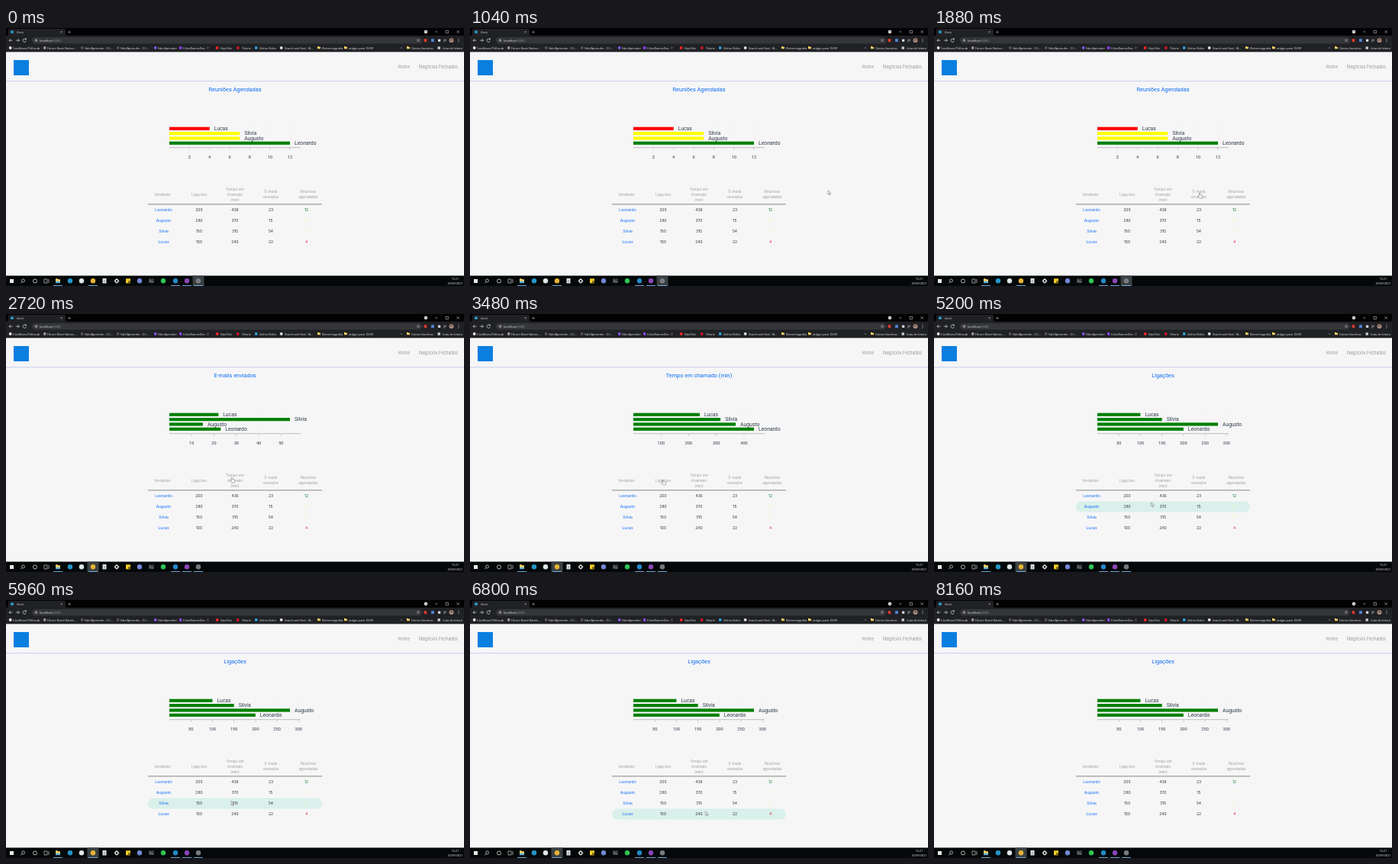
Write an HTML page that moves like this. It is 600 px wide and 338 px high and loops after 8.2 s.

```html
<!DOCTYPE html>
<html lang="pt-BR">
<head>
<meta charset="utf-8">
<title>Reuniões</title>
<style>
html, body { margin: 0; width: 100%; height: 100%; overflow: hidden; background: #f6f6f7; }
svg { display: block; width: 600px; height: 338px; }
text { dominant-baseline: central; }
.ui { font: 3.8px "Open Sans", sans-serif; fill: #e8e8ea; }
.page { font: 300 5px Inter, sans-serif; fill: #777; }
.chart { font: 6.8px Roboto, sans-serif; fill: #2f3a48; }
.chart .title { font-size: 7.35px; fill: #0b6cf2; }
.chart .tick { font-size: 5.6px; }
.mid { text-anchor: middle; }
.cell { font-weight: 400; fill: #333; }
.name { fill: #0a6cf5; }
.head { font-size: 4.8px; fill: #858585; }

.timed { visibility: hidden; animation: 8200ms step-end infinite; }
#chart0 { animation-name: chart0; }
#chart1 { animation-name: chart1; }
#chart2 { animation-name: chart2; }
#chart3 { animation-name: chart3; }
#row0 { animation-name: row0; }
#row1 { animation-name: row1; }
#row2 { animation-name: row2; }
#row3 { animation-name: row3; }
#recorder { animation-name: chart0; }
#browser { animation-name: browser; }
#hand { animation-name: hand; }
#arrow { animation-name: arrow; }
#pointer { animation: travel 8200ms linear infinite; }

@keyframes chart0 { 0% { visibility: visible } 23.17%, to { visibility: hidden } }
@keyframes chart1 { 0% { visibility: hidden } 23.17% { visibility: visible } 34.76%, to { visibility: hidden } }
@keyframes chart2 { 0% { visibility: hidden } 34.76% { visibility: visible } 43.9%, to { visibility: hidden } }
@keyframes chart3 { 0% { visibility: hidden } 43.9%, to { visibility: visible } }
@keyframes browser { 0% { visibility: hidden } 23.17%, to { visibility: visible } }
@keyframes row0 { 0% { visibility: hidden } 54.15% { visibility: visible } 62.6%, to { visibility: hidden } }
@keyframes row1 { 0% { visibility: hidden } 62.6% { visibility: visible } 71.2%, to { visibility: hidden } }
@keyframes row2 { 0% { visibility: hidden } 71.2% { visibility: visible } 77.2%, to { visibility: hidden } }
@keyframes row3 { 0% { visibility: hidden } 77.2% { visibility: visible } 88.2%, to { visibility: hidden } }
@keyframes hand { 0% { visibility: hidden } 14.6% { visibility: visible } 50%, to { visibility: hidden } }
@keyframes arrow { 0% { visibility: visible } 14.6% { visibility: hidden } 50%, to { visibility: visible } }
@keyframes travel {
  0%, 10.9% { transform: translate(604px, 215px) }
  12.68% { transform: translate(469.6px, 212.8px) }
  14.6% { transform: translate(405px, 214px) }
  18.3%, 28% { transform: translate(348px, 216px) }
  33.17%, 36% { transform: translate(296px, 214px) }
  42%, 46.5% { transform: translate(253px, 217px) }
  53.66% { transform: translate(277px, 231.5px) }
  63.41% { transform: translate(284.6px, 246.7px) }
  71.2% { transform: translate(292px, 260px) }
  77.2% { transform: translate(304px, 274px) }
  82.93%, 85.5% { transform: translate(308.4px, 276.7px) }
  92.2%, to { transform: translate(604px, 281px) }
}
</style>
</head>
<body>
<svg id="stage" viewBox="0 0 600 338" xmlns="http://www.w3.org/2000/svg"></svg>
<script>
const people = [
  { name: "Leonardo", values: [200, 436, 23, 12] },
  { name: "Augusto", values: [280, 370, 15, 7] },
  { name: "Silvia", values: [150, 315, 54, 7] },
  { name: "Lucas", values: [100, 240, 22, 4] }
];
const metrics = [
  { title: "Reuniões Agendadas", column: 3, step: 2 },
  { title: "E-mails enviados", column: 2, step: 10 },
  { title: "Tempo em chamado (min)", column: 1, step: 100 },
  { title: "Ligações", column: 0, step: 50 }
];

const rect = (x, y, w, h, fill, extra = "") =>
  `<rect x="${x}" y="${y}" width="${w}" height="${h}" fill="${fill}" ${extra}/>`;
const dot = (x, y, r, fill) => `<circle cx="${x}" cy="${y}" r="${r}" fill="${fill}"/>`;
const line = (d, color, width = .7) =>
  `<path d="${d}" fill="none" stroke="${color}" stroke-width="${width}"/>`;
const text = (x, y, value, cls = "", extra = "") =>
  `<text x="${x}" y="${y}" class="${cls}" ${extra}>${value}</text>`;
const group = (cls, body, id = "") => `<g class="${cls}" ${id && `id="${id}"`}>${body}</g>`;
const folder = (x, y, s, color = "#f2cf63") =>
  `<path d="M${x} ${y}h${s * .4}l${s * .15} ${s * .15}h${s * .45}v${s * .65}h${-s}z" fill="${color}"/>`;

function browserBar() {
  const marks = [
    [4, 9, "#eee", "CaioNeves/Trilha-ab"], [49, 54, "#999", "Fórum React Native..."],
    [98, 103, "#555", "Vale/Aprender - O I..."], [145, 150, "#555", "Vale/Aprender - O I..."],
    [194, 199, "#8257e5", "Vale Aprender"], [227, 232, "#9147ff", "CelsoRamosDev - T"],
    [275, 281, "#f22", "VejoTela"], [302, 309, "#d21420", "Telurix"],
    [326, 332, "#2aa5de", "Zelmo Video"], [359, 365, "#ddd", "Search and find - M..."]
  ];
  const folders = [[408, "Eletromiografia"], [443, "artigos para 10/09"], [525, "Outros favoritos"]];
  return rect(0, 0, 600, 10, "#020203") +
    rect(0, 10, 600, 21.4, "#202124") +
    `<path d="M1 10Q3 10 3 7V3Q3 1 5 1H76Q78 1 78 3V7Q78 10 80 10Z" fill="#202124"/>` +
    dot(8, 5.3, 2, "#2c9dcf") + text(14, 5.3, "Zorvi") +
    line("M71.5 4l2.4 2.4m0-2.4l-2.4 2.4M83 3.6v3.6m-1.8-1.8h3.6", "#ccc", .5) +
    dot(550, 5, 2.2, "#eee") + dot(550, 5, .7, "#222") +
    line("M562 5h3.5M576 3.3h3.4v3.4h-3.4zM590.5 3.3l3.4 3.4m0-3.4l-3.4 3.4", "#eee", .5) +
    line("M8.5 16.2h-4.5m2-2l-2 2 2 2M13 16.2h4.5m-2-2l2 2-2 2", "#ddd", .7) +
    line("M26.2 15a2.2 2.2 0 1 0 .2 2M26.4 13.4v1.8h-1.8", "#ddd", .7) +
    rect(34, 12, 511, 8.4, "#35363a", 'rx="4.2"') +
    dot(39.5, 16.2, 1.6, "#bbb") + dot(39.5, 16.2, .8, "#35363a") +
    text(44, 16.2, 'localhost<tspan fill="#9a9b9e">:3000</tspan>', "", 'font-size="4.1"') +
    line("M540 14.4l.5 1.2h1.3l-1 .9.4 1.3-1.2-.7-1.2.7.4-1.3-1-.9h1.3z", "#ccc", .4) +
    rect(547.5, 14.2, 3.8, 4, "#d23a2e") + rect(557, 14.2, 3.8, 4, "#4f86d8") +
    rect(566, 14.7, 3.2, 3.2, "#ddd") + line("M573 15h4m-4 1.5h4m-4 1.5h2", "#ccc", .5) +
    dot(583.5, 16.2, 2.9, "#a88d7d") + dot(583.5, 15.5, 1.1, "#4d403b") +
    [14.3, 16.2, 18.1].map(y => dot(593, y, .5, "#ddd")).join("") +
    marks.map(([x, tx, color, label]) => dot(x + 1.7, 26, 1.9, color) + text(tx, 26, label)).join("") +
    folders.map(([x, label]) => folder(x, 24.1, 4) + text(x + 6, 26, label)).join("") +
    text(517, 25.8, "»") + rect(565.5, 24.4, 3.4, 3.4, "#ccc") + text(572, 26, "Lista de leitura");
}

function barColor(metric, value) {
  if (metric.column !== 3 || value >= 10) return "green";
  return value < 5 ? "red" : "yellow";
}

function chart(metric, index) {
  const left = 214, span = 158, axis = 172;
  const peak = Math.max(...people.map(p => p.values[metric.column]));
  const scale = v => left + v / peak * span;
  let out = text(300, 80.9, metric.title, "title mid");
  for (let v = metric.step; scale(v) < left + axis; v += metric.step) {
    const x = scale(v);
    out += line(`M${x} 121V157`, "#f1f1f2", .6) + line(`M${x} 157v3`, "#aaa", .5) +
      text(x, 168.6, v, "tick mid");
  }
  out += line(`M${left} 156.7h${axis}`, "#999", .6);
  [...people].reverse().forEach((p, i) => {
    const value = p.values[metric.column], y = 129.7 + i * 6.33;
    out += rect(left, y, scale(value) - left, 4.2, barColor(metric, value)) +
      text(scale(value) + 6, y + 2.4, p.name);
  });
  return group("chart timed", out, "chart" + index);
}

function table() {
  const columns = [206, 253, 300, 347, 393.5];
  const heads = [["Vendedor"], ["Ligações"], ["Tempo em", "chamado", "(min)"],
    ["E-mails", "enviados"], ["Reuniões", "agendadas"]];
  const meetingColor = v => v >= 10 ? "#0b7a2c" : v < 5 ? "#e02a35" : "#f8f48a";
  let out = heads.map((lines, i) => group("head mid", lines.map((label, n) =>
    text(i === 4 ? 396 : i ? columns[i] : 205, 217.8 + (n - (lines.length - 1) / 2) * 6.7, label)).join(""))).join("");
  out += line("M186 230.9H414", "#555", .7);
  people.forEach((p, i) => {
    const y = 238.4 + i * 14;
    out += group("timed", rect(186, y - 6.8, 228, 14, "#daf0eb", 'rx="7"'), "row" + i) +
      text(206.5, y, p.name, "cell name mid");
    p.values.forEach((v, n) => {
      const style = n === 3 ? `style="fill:${meetingColor(v)}"` : "";
      out += text(columns[n + 1], y, v, "cell mid", style);
    });
  });
  return out;
}

function taskbar() {
  const open = [68, 114, 222, 237, 252];
  const apps = [[84, "#2496c8"], [99, "#dfe6ec"], [114, "#e5b532"], [175, "#7289da"],
    [206, "#30c653"], [222, "#2489ca"], [237, "#8b45b8"], [252, "#777b80"]];
  return rect(0, 324.5, 600, 13.5, "#050809") +
    group("timed", rect(244.5, 324.5, 15, 13.5, "#3b4042"), "recorder") +
    group("timed", rect(106.5, 324.5, 15, 13.5, "#3b4042"), "browser") +
    rect(5, 329, 5, 5, "#e8e8e8") +
    `<circle cx="22.5" cy="331" r="2" fill="none" stroke="#ddd" stroke-width=".7"/>` +
    line("M21 332.6l-1.7 1.7", "#ddd") +
    `<circle cx="38" cy="331.5" r="2.5" fill="none" stroke="#ddd" stroke-width=".8"/>` +
    line("M50 329h4v5h-4zM56 329v5", "#ccc", .7) +
    folder(65, 328.3, 6) + rect(65, 331.8, 6, 2.4, "#5fb0df") +
    apps.map(([x, color]) => dot(x, 331.3, 3.2, color)).join("") +
    rect(126.5, 328, 5, 6.5, "#dce3e8") + line("M128 330.5h2m-2 2h2", "#555", .6) +
    `<circle cx="145" cy="331.3" r="2" fill="none" stroke="#eee" stroke-width="1.3"/>` +
    line("M145 328v1.2m0 4.2v1.2M141.7 331.3h1.2m4.2 0h1.2", "#eee", .9) +
    rect(157, 328.3, 6, 6, "#f6cd22") + rect(160, 331.3, 3, 3, "#7b651c") +
    rect(187, 328.5, 7, 5.5, "#3a3f43") + line("M188.3 330l1.4 1.2-1.4 1.2M190.5 332.8h2", "#ddd", .6) +
    open.map(x => rect(x - 6, 337.1, 12, .9, "#76b9ed")).join("") +
    text(588.5, 328.6, "10:21", "mid") + text(588.5, 334.5, "20/09/2021", "mid");
}

const cursor = group("",
  group("timed", `<path d="M0 0V5.2L1.3 4.1 2.1 6 2.9 5.7 2.1 3.9H3.7Z" fill="#fff" stroke="#444" stroke-width=".45"/>`, "arrow") +
  group("timed", `<path d="M-.7 .6Q0-.4.7.6V2.6L3.4 3.2Q4 3.4 3.9 4.2L3.2 7H-.3L-2.4 4.4Q-2 3.3-.7 4.3Z" fill="#fff" stroke="#444" stroke-width=".45"/>`, "hand"),
  "pointer");

document.getElementById("stage").innerHTML =
  rect(0, 0, 600, 338, "#f6f6f7") +
  group("ui", browserBar()) +
  rect(10, 42, 20, 20, "#0a7fe0") +
  group("page",
    text(513.5, 51, "Home", "", 'font-size="5.5"') +
    text(541, 51, "Negócios Fechados", "", 'font-size="5.5"') +
    line("M0 69.7H600", "#c3c9ea", .9) + table()) +
  metrics.map(chart).join("") +
  group("ui", taskbar()) + cursor;
</script>
</body>
</html>
```
